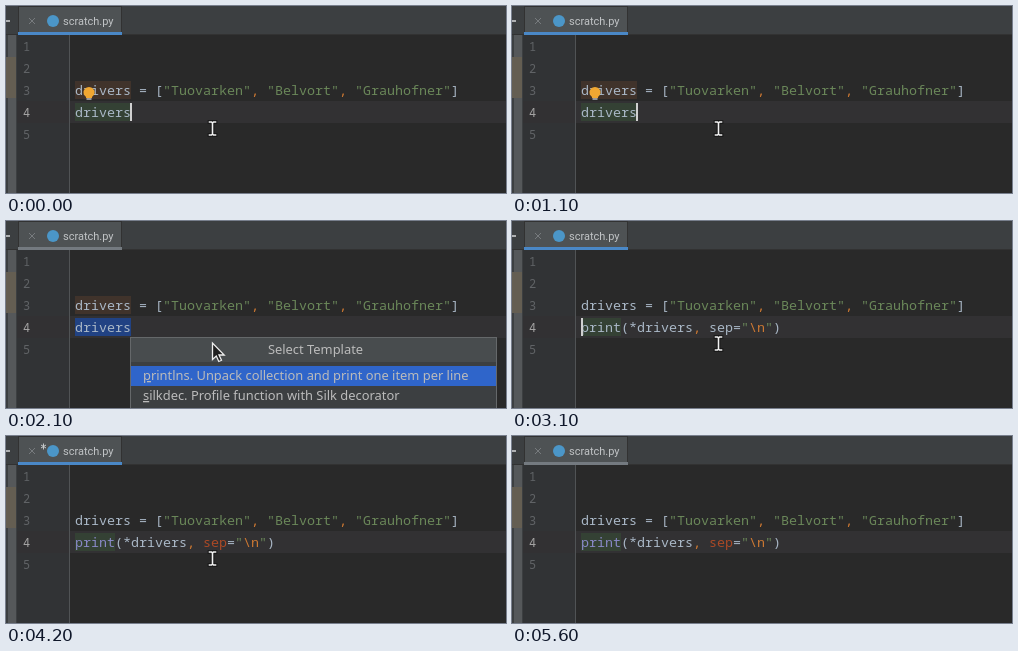
Write an HTML page that moves like this. It is 500x187 px and loops after 5.7 s.

```html
<!DOCTYPE html>
<html lang="en">
<head>
<meta charset="utf-8">
<title>Postfix template in an editor</title>
<style>
  html, body { margin: 0; width: 100%; height: 100%; overflow: hidden; background: #2b2b2b; }
  svg { display: block; width: 100%; height: 100%; }
  text { white-space: pre; fill: #a9b7c6; }
  .code text { font: 13.33px "Noto Sans Mono", monospace; }
  .numbers text { font: 12px "Noto Sans Mono", monospace; fill: #606366; }
  .popup text { font: 12.9px "Noto Sans", sans-serif; fill: #bbb; }
  .tab { font: 11px Roboto, sans-serif; fill: #c0c3c5; }
  .string { fill: #6a8759; }
  .keyword { fill: #cc7832; }
  .mnemonic { text-decoration: underline; }
</style>
</head>
<body>
<svg viewBox="0 0 500 187" preserveAspectRatio="none">
  <!-- Window, gutter and tab bar -->
  <rect width="500" height="187" fill="#292929"/>
  <rect x="11" y="29" width="52" height="158" fill="#313335"/>
  <rect x="11" y="95" width="489" height="22" fill="#323133"/>
  <path d="M63.5 29V187" stroke="#505355"/>
  <rect y="29" width="11" height="158" fill="#3c3f41"/>
  <rect x="2" y="29" width="8" height="158" fill="#55585a"/>
  <rect y="51" width="10" height="41" fill="#645e52"/>
  <rect width="500" height="29" fill="#3c3f41"/>
  <path d="M0 28.5H500" stroke="#323232"/>
  <path d="M0 15H4" stroke="#afb1b3" stroke-width="2"/>
  <rect x="12.5" y="0.5" width="103" height="28" fill="#4e5254" stroke="#323232"/>
  <rect x="12" y="26" width="104" height="3" fill="#4a88c7" data-on="0-2100 3100-5600"/>
  <rect x="12" y="26" width="104" height="3" fill="#747a80" data-on="2100-3100 5600-5700"/>
  <path d="M23 12l6 6m0-6l-6 6" stroke="#777b7e"/>
  <circle cx="47" cy="15" r="6" fill="#4b96c8"/>
  <path d="M37.5 7.5v6M35 9l5 3M40 9l-5 3" stroke="#c5c8ca" data-on="3500-5100"/>
  <text class="tab" x="57" y="19">scratch.py</text>

  <g class="numbers">
    <text x="17" y="45">1</text>
    <text x="17" y="67">2</text>
    <text x="17" y="89">3</text>
    <text x="17" y="111" style="fill:#a4a3a3">4</text>
    <text x="17" y="133">5</text>
  </g>

  <!-- Usage highlights and selection -->
  <rect x="69" y="75" width="56" height="18" fill="#40332b" data-on="0-3100"/>
  <rect x="69" y="97" width="56" height="18" fill="#344134" data-on="0-2100"/>
  <rect x="69" y="97" width="56" height="18" fill="#214283" data-on="2100-3100"/>
  <rect x="69" y="97" width="40" height="18" fill="#344134" data-on="3100-5700"/>

  <g class="code">
    <text x="69" y="89">drivers = [<tspan class="string">"Tuovarken"</tspan><tspan class="keyword">,</tspan> <tspan class="string">"Belvort"</tspan><tspan class="keyword">,</tspan> <tspan class="string">"Grauhofner"</tspan>]</text>
    <text x="69" y="111" data-on="0-3100">drivers</text>
    <text x="69" y="111" data-on="3100-5700"><tspan id="call">print</tspan>(*drivers<tspan class="keyword">,</tspan> <tspan id="argument">sep</tspan>=<tspan class="string">"<tspan class="keyword">\n</tspan>"</tspan>)</text>
  </g>

  <g data-on="0-2100">
    <path d="M80 91a5.5 5.5 0 1 1 6 0v1h-6z" fill="#f0a732"/>
    <path d="M80.5 93h5" stroke="#b8babc" stroke-width="1.5"/>
  </g>
  <rect x="124" y="97" width="2" height="18" fill="#d0d0d0" data-on="0-600 1100-1600 2000-2100"/>
  <rect x="69" y="97" width="2" height="18" fill="#d0d0d0" data-on="3100-4200 4800-5600"/>

  <g class="popup" data-on="2100-3100">
    <rect x="124.5" y="116.5" width="366" height="80" fill="#3c3f41" stroke="#65686a"/>
    <rect x="125" y="117" width="365" height="24" fill="#484c4e"/>
    <rect x="125" y="145" width="365" height="20" fill="#2f65ca"/>
    <text x="309.5" y="133" text-anchor="middle">Select Template</text>
    <text x="137" y="159"><tspan class="mnemonic">p</tspan>rintlns. Unpack collection and print one item per line</text>
    <text x="137" y="179"><tspan class="mnemonic">s</tspan>ilkdec. Profile function with Silk decorator</text>
  </g>

  <!-- Mouse pointers -->
  <path d="M206.5 122v16.5l3.8-3.5 2.5 5.5 2.7-1.2-2.5-5.3h5.2z" fill="#202020" stroke="#eee" stroke-width="1.3" data-on="2000-3100"/>
  <defs>
    <path id="stem" d="M-3-6.5h2L0-5.5l1-1H3M0-5.5V5.5M-3 6.5h2L0 5.5l1 1H3"/>
  </defs>
  <g id="beam" fill="none" stroke-linecap="square" data-on="0-2000 3100-5400">
    <use href="#stem" stroke="#151515" stroke-width="3.6"/>
    <use href="#stem" stroke="#f2f2f2" stroke-width="1.6"/>
  </g>
</svg>
<script>
  const LOOP = 5700;
  const byId = id => document.getElementById(id);
  const timed = [...document.querySelectorAll("[data-on]")].map(node => ({
    node,
    spans: node.dataset.on.split(" ").map(span => span.split("-").map(Number))
  }));

  function beamPosition(t) {
    if (t >= 5300) return "307 50";
    if (t >= 5200) return "232 105";
    return "206.5 122.5";
  }

  function draw(now) {
    const t = now % LOOP;
    for (const { node, spans } of timed) {
      const on = spans.some(([from, to]) => t >= from && t < to);
      node.style.display = on ? "" : "none";
    }
    const analysed = t >= 3200;
    byId("call").style.fill = analysed ? "#8888c6" : "";
    byId("argument").style.fill = analysed ? "#aa4926" : "";
    byId("beam").setAttribute("transform", `translate(${beamPosition(t)})`);
    requestAnimationFrame(() => draw(performance.now()));
  }
  draw(0);
</script>
</body>
</html>
```
